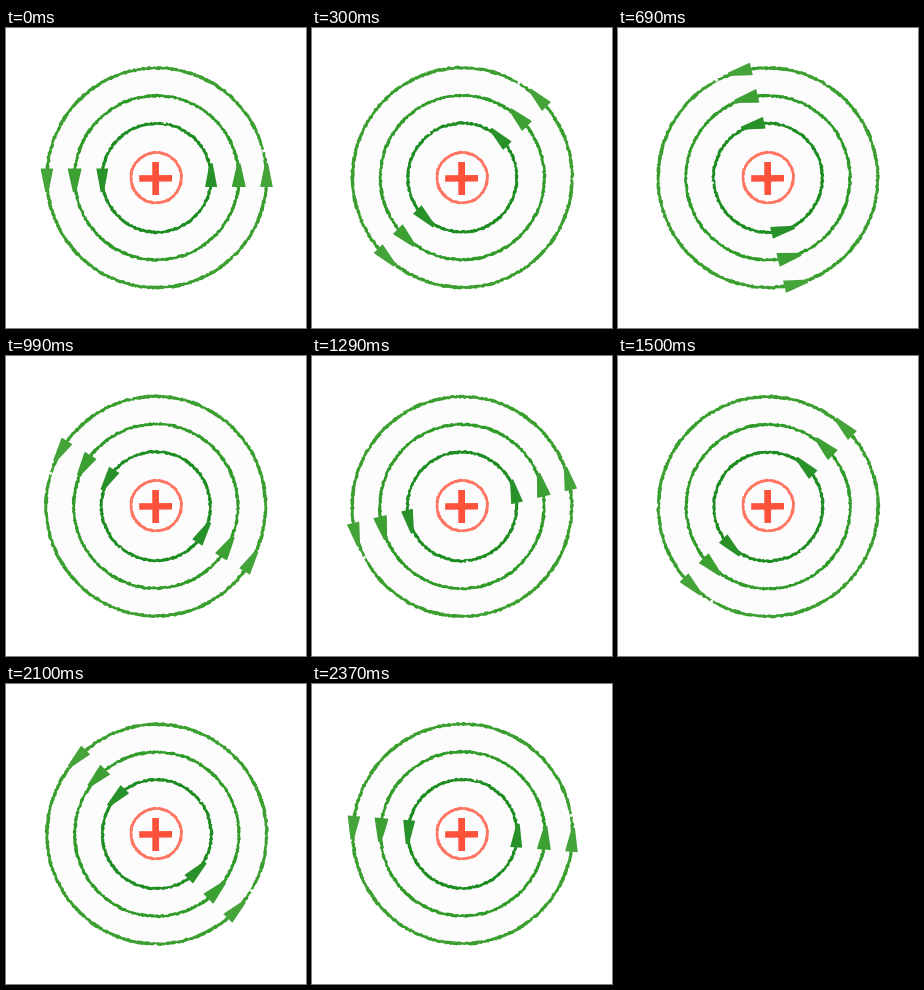
Recreate the animation shown at these times as an HTML page with a canvas. Size 300 px wide and 300 px high, loop 2400 ms.

```html
<!DOCTYPE html>
<html lang="en">
<head>
<meta charset="utf-8">
<title>Field around a positive current</title>
<style>
  html, body { margin: 0; height: 100%; overflow: hidden; background: #fff; }
  canvas { display: block; }
</style>
</head>
<body>
<canvas id="stage" width="300" height="300"></canvas>
<script>
const ctx = document.getElementById('stage').getContext('2d');
const LOOP = 2400, STEP = 30, TAU = Math.PI * 2;

let seed = 7;
const random = () => (seed = (seed * 16807) % 2147483647) / 2147483647;

// Brushed ring: a band whose two edges wander a little.
function brushRing(radius, width, roughness) {
  const path = new Path2D();
  const count = Math.round(radius * 4);
  for (const side of [1, -1]) {
    for (let i = 0; i < count; i++) {
      const a = side * i / count * TAU;
      const r = radius + side * width / 2 + (random() - 0.5) * roughness;
      const x = r * Math.cos(a), y = r * Math.sin(a);
      i ? path.lineTo(x, y) : path.moveTo(x, y);
    }
    path.closePath();
  }
  return path;
}

// Gaps are worn spots in the paint: [x, y, size] from the centre.
const fields = [
  { radius: 109.8, width: 3.2, half: 6.3, color: '#3a9f2e', head: '#45a439', gaps: [[107, -27, 1.6], [78, 80, 1.7]] },
  { radius: 82.1, width: 3, half: 6.9, color: '#319b29', head: '#3ca033', gaps: [] },
  { radius: 54.4, width: 3, half: 6, color: '#1e8d21', head: '#289129', gaps: [[8, -55, 1.3]] }
].map(f => ({ ...f, ring: brushRing(f.radius, f.width, 1.3) }));

const chargeRing = brushRing(25.2, 3, 0.8);

function disc(x, y, r, color) {
  ctx.fillStyle = color;
  ctx.beginPath();
  ctx.arc(x, y, r, 0, TAU);
  ctx.fill();
}

function polygon(points) {
  ctx.beginPath();
  points.forEach(([x, y]) => ctx.lineTo(x, y));
  ctx.fill();
}

function drawField({ radius, half, color, head, ring, gaps }) {
  ctx.fillStyle = color;
  ctx.fill(ring);
  ctx.fillStyle = head;
  for (const side of [1, -1]) {
    polygon([
      [side * (radius - half), side * 9.3],
      [side * (radius - half + 0.6), side * 6],
      [side * (radius - 1.6), side * -14.5],
      [side * (radius + 1.6), side * -14.5],
      [side * (radius + half - 0.6), side * 6],
      [side * (radius + half), side * 9.3]
    ]);
  }
  gaps.forEach(([x, y, size]) => disc(x, y, size, '#fcfcfc'));
}

function drawCharge() {
  ctx.save();
  ctx.translate(150.2, 149.7);
  ctx.fillStyle = '#ff7561';
  ctx.fill(chargeRing);
  ctx.fillStyle = '#fc523b';
  polygon([[-4, -15.8], [2.8, -15.8], [2.9, 17.3], [-3.8, 17.3]]);
  polygon([[-17, -2.4], [15.8, -2.6], [15.8, 3.9], [-17, 4.1]]);
  ctx.restore();
}

function draw(now) {
  const turn = Math.floor(now % LOOP / STEP) * STEP / LOOP;
  ctx.fillStyle = '#fff';
  ctx.fillRect(0, 0, 300, 300);
  ctx.save();
  ctx.translate(150.3, 150.1);
  ctx.rotate(-turn * TAU);
  ctx.translate(0.4, -0.3);
  disc(0, 0, 110, '#fcfcfc');
  fields.forEach(drawField);
  ctx.restore();
  drawCharge();
}

const start = performance.now();
function tick() {
  draw(performance.now() - start);
  requestAnimationFrame(tick);
}
tick();
</script>
</body>
</html>
```
